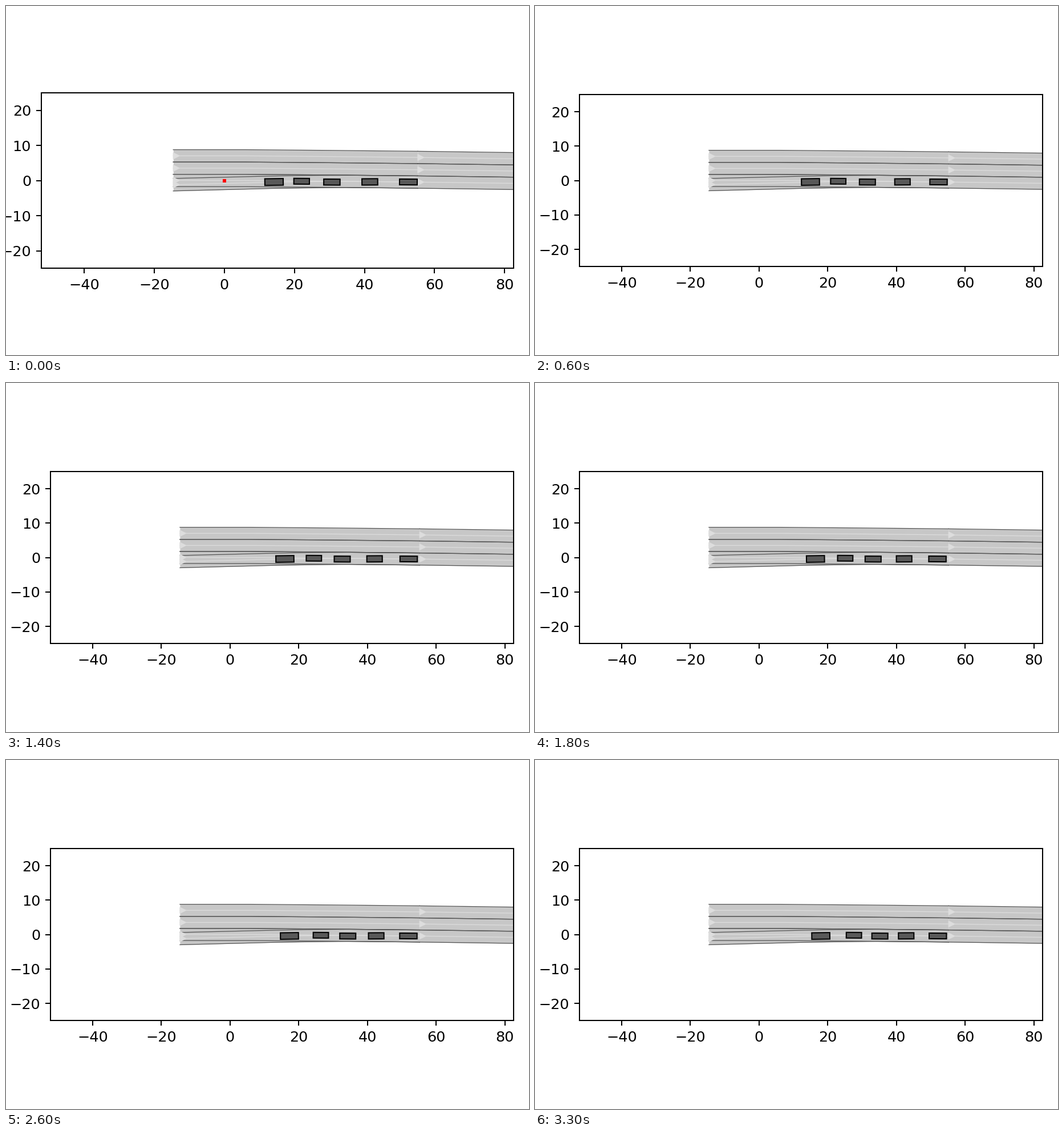
Animation, 917 px wide and 611 px high, one loop 3400 ms. Source, as a matplotlib script:

```python
import numpy as np
import matplotlib.pyplot as plt
from matplotlib.animation import FuncAnimation
from matplotlib.patches import Polygon

W, H, DPI = 917, 611, 183.4
FRAMES, STEP = 34, 100
XLIM, YLIM = (-52.25, 82.5), (-25, 25)
RIGHT, MID = 889.6, 305.7
START, JOIN, END = -14.6, 55.2, 95.0

fig = plt.figure(figsize=((W + 0.001) / DPI, (H + 0.001) / DPI), dpi=DPI)
ax = fig.add_axes([0.1, 0.2, 0.8, 0.6])
ax.set_xlim(*XLIM)
ax.set_ylim(*YLIM)
ax.set_xticks(range(-40, 81, 20))
ax.set_yticks(range(-20, 21, 10))


def place_axes(left):
    """Fit the axes between left and RIGHT with equal scales."""
    scale = (RIGHT - left) / (XLIM[1] - XLIM[0])
    height = scale * (YLIM[1] - YLIM[0])
    bottom = H - MID - height / 2
    ax.set_position([left / W, bottom / H, (RIGHT - left) / W, height / H])


def bend(x):
    return np.interp(x, [6, 30, 55, 82.5, 95], [0, -0.2, -0.45, -0.82, -1.0])


def straight(offset):
    return lambda x: offset + bend(x)


def ramp(offset, xs, ys):
    """Boundary that merges into the straight one at the last point."""
    return lambda x: np.where(x < xs[-1], np.interp(x, xs, ys), offset + bend(x))


def draw_lane(x0, x1, upper, lower):
    x = np.linspace(x0, x1, 120)
    top, low = upper(x), lower(x)
    mid = (top + low) / 2
    ax.fill_between(x, low, top, color="#c7c7c7", lw=0, zorder=1)
    for y in (top, low):
        ax.plot(x, y, color="#555555", lw=0.5, zorder=1.2)
    ax.plot(x, mid, color="#dddddd", lw=0.5, zorder=1.3)
    size = 0.5 * (top[0] - low[0])
    slope = (mid[1] - mid[0]) / (x[1] - x[0])
    arrow = [(x0, mid[0] - size / 2), (x0 + size, mid[0] + slope * size),
             (x0, mid[0] + size / 2)]
    ax.add_patch(Polygon(arrow, fc="#dddddd", ec="#dddddd", lw=0.5, zorder=1.4))


edges = [straight(v) for v in (8.82, 5.3, 1.8, -1.72)]
for upper, lower in zip(edges, edges[1:]):
    draw_lane(START, JOIN, upper, lower)
    draw_lane(JOIN, END, upper, lower)
knots = [START, 13, 22, 35]
draw_lane(START, JOIN,
          ramp(1.8, knots, [0.62, 1.28, 1.45, 1.56]),
          ramp(-1.72, knots, [-2.95, -2.25, -2.1, -1.96]))

# length, width, y, heading in degrees, x as a function of the step
CARS = [
    (5.25, 1.9, -0.39, 0.8, lambda t: 14.17 + 0.138 * t - 0.00068 * t**2),
    (4.45, 1.65, -0.18, -0.4, lambda t: 22.05 + 0.169 * t),
    (4.65, 1.7, -0.42, -0.4, lambda t: 30.69 + 0.145 * t - 0.00027 * t**2),
    (4.5, 1.8, -0.36, 0.4, lambda t: 41.52 + 0.04 * t),
    (5.05, 1.65, -0.39, -0.4,
     lambda t: 51.91 + 0.00135 * (t - 23)**2 + 8e-6 * (t - 23)**3),
]


def corners(x, y, length, width, heading):
    a = np.radians(heading)
    box = np.array([(-1, -1), (1, -1), (1, 1), (-1, 1)]) * (length / 2, width / 2)
    turn = np.array([(np.cos(a), np.sin(a)), (-np.sin(a), np.cos(a))])
    return box @ turn + (x, y)


boxes = [ax.add_patch(Polygon(np.zeros((4, 2)), fc="#595959", ec="black",
                              lw=0.8, zorder=2.2)) for _ in CARS]
dot, = ax.plot([0], [0], "s", color="red", ms=2, mew=0, zorder=2.3)


def update(t):
    place_axes(62 if t == 0 else 78.2)
    dot.set_visible(t == 0)
    for box, (length, width, y, heading, path) in zip(boxes, CARS):
        box.set_xy(corners(path(t), y, length, width, heading))
    return [dot, *boxes]


anim = FuncAnimation(fig, update, frames=FRAMES, interval=STEP,
                     repeat=True, repeat_delay=0, blit=False)
plt.show()
```
